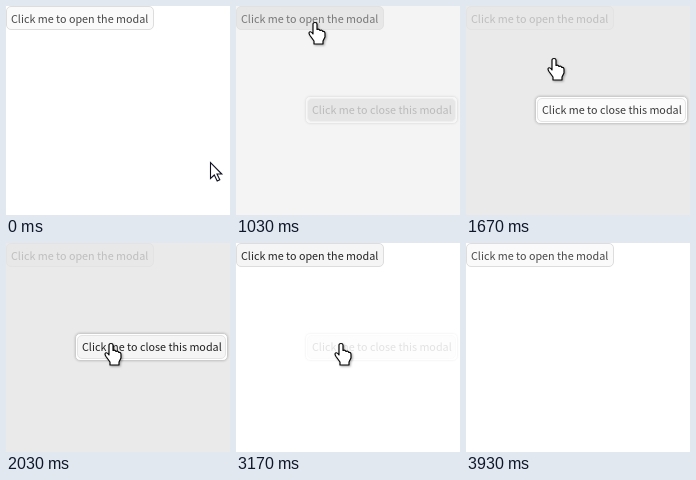
Animation, 224 px wide and 209 px high, one loop 4.66 s. Source, as an HTML page:

```html
<!DOCTYPE html>
<html lang="en">
<head>
<meta charset="utf-8">
<title>Modal demo</title>
<style>
html, body { margin: 0; width: 100%; height: 100%; overflow: hidden; background: #fff; }
svg { display: block; }
text { font: 10.77px "Noto Sans CJK SC", "Noto Sans CJK JP", "Noto Sans CJK", sans-serif; }
#modal { filter: drop-shadow(0 0 1px rgba(0,0,0,.2)); }
#hand { filter: drop-shadow(1px 1px 1px rgba(0,0,0,.35)); }
</style>
</head>
<body>
<svg width="224" height="209">
  <g id="opener">
    <rect class="button" x=".5" y=".5" width="147" height="23" rx="4.5" stroke="#ddd"/>
    <text x="5" y="17">Click me to open the modal</text>
  </g>
  <rect id="overlay" width="224" height="209" fill="#e5e5e5"/>
  <g id="modal">
    <rect x="69.5" y="90.5" width="152" height="27" rx="4.5" fill="#fff" stroke="#ccc"/>
    <rect class="button" x="71.5" y="92.5" width="148" height="23" rx="4.5" stroke="#e4e4e4"/>
    <text x="76" y="108">Click me to close this modal</text>
  </g>
  <path id="arrow" fill="#fff" stroke="#112" stroke-width="1.1"
    d="M.5 .5V16.5L4.3 13L7.2 19L9.8 17.8L7 12H11.8Z"/>
  <path id="hand" fill="#fff" stroke="#000" stroke-width="1.15" stroke-linejoin="round"
    d="M-2 2Q-2 .5 0 .5Q2 .5 2 2V7.5Q4 6.5 5 8.5Q7 7.5 7.8 9.5Q10 9 10 11.5V15L8 19V22H-1V19L-5 13.5Q-7 10.5-5 9.8Q-3.5 9.5-2 12Z"/>
</svg>
<script>
const $ = id => document.getElementById(id);
const LOOP = 4660;

// Pointer trips: each follows a quadratic curve from, bend, to
const start = [204, 156], opener = [79, 16], closer = [105, 100], exit = [74, 212];
const trips = [
  { begin: 30, end: 600, from: start, bend: [85, 71], to: opener },
  { begin: 1330, end: 1970, from: opener, bend: [78, 26], to: closer },
  { begin: 3240, end: 3920, from: closer, bend: [100, 96], to: exit }
];

const ramp = (t, a, b) => Math.min(1, Math.max(0, (t - a) / (b - a)));
const mix = (a, b, p) => a + (b - a) * p;
const within = (t, a, b) => t >= a && t < b;
const easeOut = p => 1 - (1 - p) ** 1.25;
const gray = v => `rgb(${v},${v},${v})`;

function tipAt(t) {
  const { begin, end, from, bend, to } = trips.findLast(trip => t >= trip.begin) || trips[0];
  const s = easeOut(ramp(t, begin, end));
  return [0, 1].map(i => Math.round(mix(mix(from[i], bend[i], s), mix(bend[i], to[i], s), s)));
}

function paint(id, fill, ink) {
  $(id).querySelector(".button").setAttribute("fill", gray(fill));
  $(id).querySelector("text").setAttribute("fill", gray(ink));
}

function draw(t) {
  const hover = ramp(t, 550, 630) * (1 - ramp(t, 3200, 3300));
  const pressed = within(t, 1030, 1170);
  paint("opener", pressed ? 231 : mix(250, 245, hover), mix(72, 38, hover));

  const opening = ramp(t, 1030, 1170);
  const shown = t >= 1030;
  $("overlay").style.opacity = shown ? .8 * mix(.53, 1, opening) * (1 - ramp(t, 3000, 3150)) : 0;
  $("modal").style.opacity = shown ? mix(.3, 1, opening) * (1 - ramp(t, 3010, 3194)) : 0;

  const over = ramp(t, 1860, 2030);
  const fill = within(t, 2770, 3030) ? 239 : mix(mix(200, 251, opening), 245, over);
  paint("modal", fill, mix(60, 34, over));

  const [x, y] = tipAt(t);
  const pointing = within(t, 565, 3230);
  for (const id of ["arrow", "hand"]) {
    $(id).setAttribute("transform", `translate(${x} ${y})`);
    $(id).style.display = (id === "hand") === pointing ? "" : "none";
  }
}

const loaded = performance.now();
function frame() {
  draw((performance.now() - loaded) % LOOP);
  requestAnimationFrame(frame);
}
frame();
</script>
</body>
</html>
```
